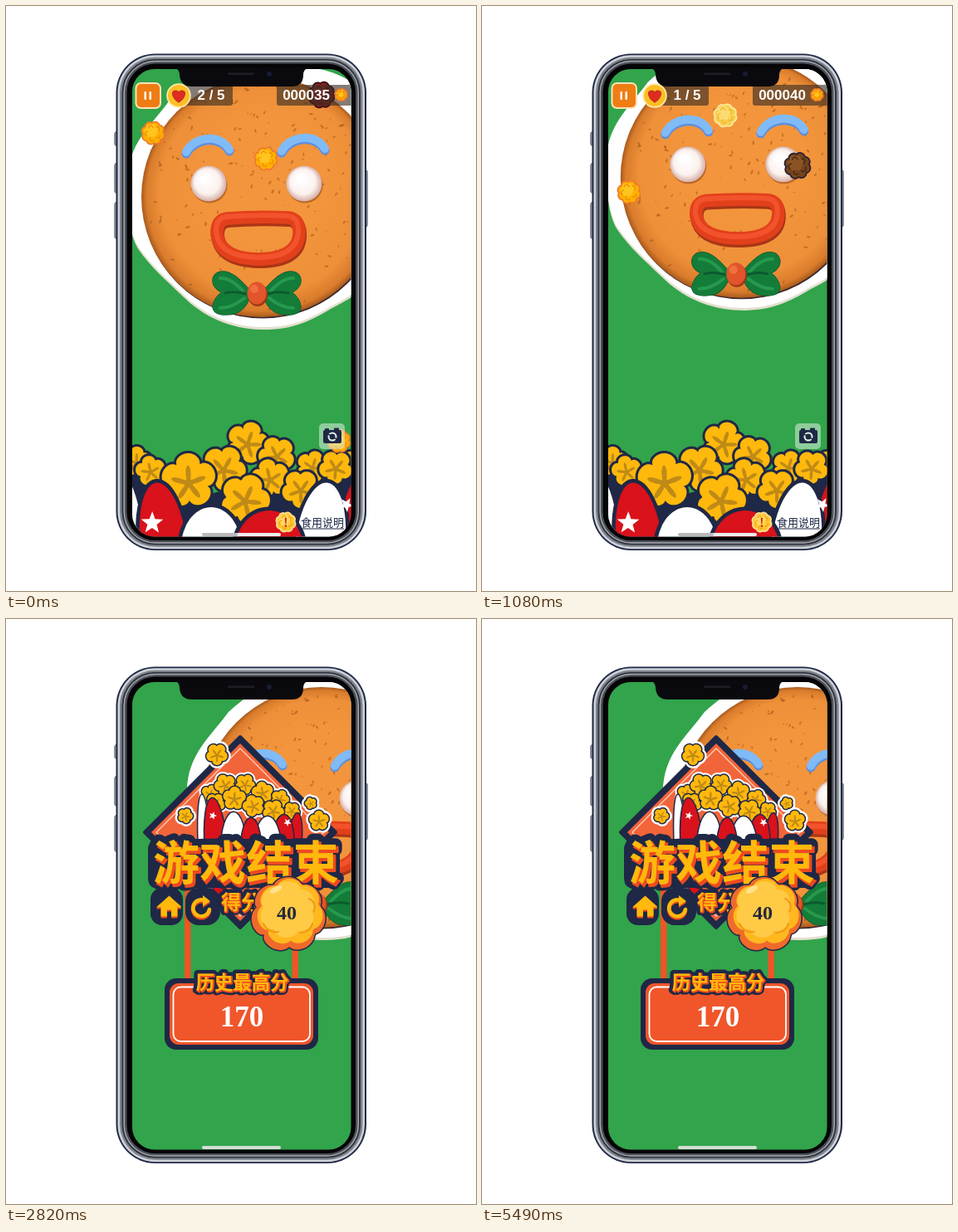
Recreate the animation shown at these times as an HTML page with a canvas. Size 566x705 px, loop 5.52 s.

```html
<!DOCTYPE html>
<html lang="zh">
<head>
<meta charset="utf-8">
<style>
  html, body { margin: 0; width: 566px; height: 705px; overflow: hidden; background: #fff; }
  canvas { display: block; }
</style>
</head>
<body>
<canvas id="stage" width="566" height="705"></canvas>
<script>
const ctx = document.getElementById('stage').getContext('2d');
const LOOP = 5520, GAME_OVER = 2100, EATEN = 740, MISSED = 600;
const NAVY = '#1f2846', GREEN = '#32a44b', GOLD = '#ffb80c', RED = '#d9121b';
const SANS = '"Liberation Sans", Arial, sans-serif';
const SERIF = '"Liberation Serif", "Times New Roman", serif';
const CJK = '"Noto Sans CJK SC", "Noto Sans CJK", sans-serif';
const TAU = Math.PI * 2;

// time, x, y, mouth opening, brow and eye shift
const faceKeys = [
  [0, 0, 0, 1, 0], [810, -3, -24, 1.08, 0], [1170, 5, -23, .9, 0],
  [1440, 86, -21, .32, 0], [1860, 73, -4, 1.04, 0], [GAME_OVER, 72, -3, 1, 1]
];
const goldDrop = [[0, 153], [810, 207], [1440, 247], [1860, 274], [2100, 290]];
const darkDrop = [[0, 107], [810, 167], [1440, 226], [1860, 264], [2100, 286]];
const paleDrop = [[0, 45], [810, 110], [1440, 161], [1860, 197], [2100, 217]];
const nextDrop = [[0, 30], [1440, 97], [1860, 121], [2100, 136]];

function sample(keys, t, ease = k => k) {
  let i = 0;
  while (i < keys.length - 2 && t > keys[i + 1][0]) i++;
  const a = keys[i], b = keys[i + 1];
  const k = ease(Math.min(1, (t - a[0]) / (b[0] - a[0])));
  return a.map((v, n) => v + (b[n] - v) * k);
}
const smooth = k => k * k * (3 - 2 * k);
const dropY = (keys, t) => sample(keys, t)[1];

function paint(path, fill, stroke, width = 1) {
  if (stroke) {
    ctx.strokeStyle = stroke;
    ctx.lineWidth = width;
    ctx.lineJoin = ctx.lineCap = 'round';
    ctx.stroke(path);
  }
  if (fill) { ctx.fillStyle = fill; ctx.fill(path); }
}
function box(x, y, w, h, r, fill, stroke, width) {
  const p = new Path2D();
  p.roundRect(x, y, w, h, r);
  paint(p, fill, stroke, width);
  return p;
}
function oval(x, y, rx, ry, fill, stroke, width, tilt = 0) {
  const p = new Path2D();
  p.ellipse(x, y, rx, ry, tilt, 0, TAU);
  paint(p, fill, stroke, width);
}
const shape = (d, fill, stroke, width) => paint(new Path2D(d), fill, stroke, width);

function polar(x, y, radius) {
  const p = new Path2D();
  for (let i = 0; i < 90; i++) {
    const a = i / 90 * TAU, r = radius(a);
    p.lineTo(x + r * Math.cos(a), y + r * Math.sin(a));
  }
  p.closePath();
  return p;
}
const lobes = (x, y, r, n, depth, turn = 0) =>
  polar(x, y, a => r * (1 - depth + depth * Math.sqrt(Math.abs(Math.cos(n / 2 * (a - turn))))));

function star(x, y, r, turn) {
  const p = new Path2D();
  for (let i = 0; i < 10; i++) {
    const a = turn + i * Math.PI / 5, q = i % 2 ? r * .42 : r;
    p.lineTo(x + q * Math.cos(a), y + q * Math.sin(a));
  }
  paint(p, '#fff');
}
function text(s, x, y, font, fill, stroke, width) {
  ctx.font = font;
  ctx.textAlign = 'center';
  if (stroke) {
    ctx.strokeStyle = stroke;
    ctx.lineWidth = width;
    ctx.lineJoin = 'round';
    ctx.strokeText(s, x, y);
  }
  ctx.fillStyle = fill;
  ctx.fillText(s, x, y);
}
function label(s, x, y, size, border, depth) {
  const font = `bold ${size}px ${CJK}`;
  text(s, x, y, font, NAVY, NAVY, border);
  text(s, x + depth, y + depth, font, '#ee4a20', '#ee4a20', 2);
  text(s, x, y, font, GOLD);
}

function kernel(x, y, r, turn, border = 6) {
  paint(lobes(x, y, r, 5, .32, turn), GOLD, NAVY, border);
  paint(polar(x, y + r * .1, a => r * (.16 + .5 * Math.cos(2.5 * (a - turn)) ** 4)), '#bf8a16');
}
function popcorn(x, y, r, fill, edge, shade, light) {
  paint(lobes(x, y, r, 8, .22, .3), fill, edge, 3.5);
  paint(lobes(x - r * .15, y - r * .2, r * .65, 6, .3, 1), light);
  for (let i = 0; i < 5; i++) {
    const a = i * TAU / 5 + .5, p = new Path2D();
    p.arc(x + r * .5 * Math.cos(a), y + r * .5 * Math.sin(a), r * .22, a - 1, a + 1.8);
    paint(p, null, shade, 1.3);
  }
}
const goldCorn = (x, y, r = 13) => popcorn(x, y, r, '#ffb000', '#f07a2c', '#ef8e08', '#ffc51e');
const paleCorn = (x, y) => popcorn(x, y, 13, '#f8cf4e', '#fbeaa0', '#eeb52f', '#fbdc72');
function darkCorn(x, y, t) {
  const red = t < 400;
  popcorn(x, y, 15, red ? '#8a2023' : '#75431b', red ? '#351018' : '#2b2031',
    red ? '#541319' : '#3e2517', red ? '#a52728' : '#8c5425');
}

// a scallop of the striped bucket
function scallop(x, w, top, bottom, fill, tilt = 0, border = 9) {
  oval(x, bottom, w, bottom - top, fill, NAVY, border, tilt);
}

const specks = (() => {
  let seed = 7;
  const rnd = () => (seed = seed * 16807 % 2147483647) / 2147483647;
  return Array.from({ length: 190 }, () => {
    const a = rnd() * TAU, r = 138 * Math.sqrt(rnd());
    return [308 + r * Math.cos(a), 230 + r * Math.sin(a), .5 + rnd() * 1.4, rnd() * 3];
  });
})();

function eye(x, y) {
  const g = ctx.createRadialGradient(x - 5, y - 7, 3, x, y, 22);
  g.addColorStop(0, '#fff');
  g.addColorStop(.65, '#fbf1ee');
  g.addColorStop(1, '#d3aaa0');
  oval(x + 1, y + 2, 21.5, 21.5, 'rgba(140,65,20,.55)');
  oval(x, y, 21.5, 21.5, g);
}
function brow(x, y) {
  const d = `M${x - 26} ${y + 9}C${x - 16} ${y - 11} ${x + 16} ${y - 13} ${x + 26} ${y + 6}`;
  ctx.save();
  ctx.translate(0, 2);
  shape(d, null, '#5d8fdc', 11);
  ctx.restore();
  shape(d, null, '#80bbf8', 10);
}
function bowTie() {
  const lobe = 'M292 341C284 333 275 321 262 320C251 320 247 328 250 336Q253 342 260 345' +
    'Q250 352 249 363C250 373 264 373 275 371Q287 367 293 353Z';
  for (const side of [1, -1]) {
    ctx.save();
    if (side < 0) { ctx.translate(604, 0); ctx.scale(-1, 1); }
    shape(lobe, '#147c39', '#0c5a2e', 1.5);
    shape('M258 328Q270 327 285 343M258 364Q272 364 287 352', null, '#26994d', 4);
    shape('M264 346Q276 343 289 347', null, '#0b5b2d', 3);
    ctx.restore();
  }
  oval(303, 348, 12, 14, '#a43616');
  oval(302, 346, 11.5, 13.5, '#e2542a');
  oval(299, 341, 5, 5, '#f0703f');
}
function face(t) {
  const [, dx, dy, open, shift] = sample(faceKeys, t, smooth);
  ctx.save();
  ctx.translate(dx, dy);
  const icing = 'M146 214C146 250 149 278 160 294C174 314 190 328 212 349C237 374 269 389 307 390' +
    'C343 391 366 380 391 365C430 345 470 320 476 250C484 160 444 72 340 76C260 72 226 90 196 118' +
    'C174 148 146 170 146 214Z';
  shape(icing, '#e3dfcf');
  ctx.save();
  ctx.translate(0, -3);
  shape(icing, '#fff');
  ctx.restore();

  oval(309, 231.5, 145, 145, '#3a2730');
  const g = ctx.createRadialGradient(312, 208, 70, 308, 230, 145);
  g.addColorStop(0, '#f3953c');
  g.addColorStop(.72, '#ee9039');
  g.addColorStop(.92, '#d97c2c');
  g.addColorStop(1, '#a85a1d');
  oval(308, 230, 145, 145, g);
  for (const [x, y, r, a] of specks) oval(x, y, r * 1.5, r * .7, 'rgba(150,78,18,.5)', null, 0, a);

  ctx.save();
  ctx.translate(-8 * shift, 5 * shift);
  brow(243, 167);
  brow(358, 166);
  eye(244, 214);
  eye(359, 214);
  ctx.restore();

  const Y = y => 280 + (y - 280) * open;
  const mouth = `M266 ${Y(256)}Q303 ${Y(253)} 340 ${Y(255)}Q354 ${Y(256)} 353 ${Y(275)}` +
    `Q351 ${Y(305)} 303 ${Y(305)}Q258 ${Y(304)} 254 ${Y(275)}Q253 ${Y(258)} 266 ${Y(256)}Z`;
  ctx.save();
  ctx.translate(1, 3);
  shape(mouth, null, '#a93516', 16);
  ctx.restore();
  shape(mouth, null, '#e2401b', 15.5);
  ctx.save();
  ctx.translate(-1, -2);
  shape(mouth, null, '#f3532c', 6);
  ctx.restore();
  bowTie();
  ctx.restore();
}

function pile() {
  shape('M152 566Q200 560 240 590Q300 570 345 590Q390 570 416 560V640H152Z', NAVY);
  [[157, 549, 18, 1], [174, 560, 18, 2], [291, 526, 25, 0], [326, 541, 22, .5], [414, 553, 16, 1],
   [369, 555, 19, 0], [397, 556, 20, .4], [262, 557, 27, .2], [318, 569, 23, .7],
   [355, 582, 23, .3], [220, 572, 33, .9], [288, 594, 30, .1]
  ].forEach(k => kernel(...k));
  scallop(150, 17, 567, 650, '#fff', -.1);
  scallop(416, 21, 560, 655, RED, .15);
  scallop(378, 30, 574, 650, '#fff', .12);
  scallop(190, 28, 574, 650, RED, -.12);
  scallop(247, 36, 604, 652, '#fff');
  scallop(317, 41, 608, 654, RED);
  star(176, 623, 14, -.3);
  star(410, 601, 9, .2);
}
function controls() {
  box(377, 503, 31, 31, 5, 'rgba(220,238,222,.55)');
  box(382, 511, 22, 16, 2, NAVY);
  box(384, 509, 5, 3, 1, NAVY);
  box(395, 508.5, 6, 3, 1, NAVY);
  oval(393, 519, 4.5, 4.5, null, '#e6f2e8', 2);
  shape('M387 516l3 1M399 522l-3 -1', null, NAVY, 1.5);
  popcorn(337, 622, 11, '#ffc52d', '#fbdf93', '#f0a61c', '#ffd75e');
  text('!', 337, 628, `bold 16px ${SERIF}`, '#c9281a');
  text('食用说明', 381, 627, `500 13px ${CJK}`, NAVY, '#fff', 2);
  box(355, 629.5, 52, 1, 0, NAVY);
}
function hud(t) {
  box(204, 95, 69, 25, 3, 'rgba(55,45,35,.62)');
  box(326, 95, 92, 25, 3, 'rgba(55,45,35,.62)');
  box(157.5, 94, 27.5, 28, 5, '#ef7d14', '#ffe3b5', 4);
  box(166.5, 103, 2.5, 10, 1, '#fff');
  box(172.5, 103, 2.5, 10, 1, '#fff');
  oval(208, 108, 13, 13, '#ffbd24', '#ffe9a8', 3.5);
  shape('M208 116C199 110 199 102 204 102Q207 102 208 105Q209 102 212 102C217 102 217 110 208 116Z', '#e02a22', '#8f241d', 1.2);
  text(t < MISSED ? '2 / 5' : '1 / 5', 247, 113, `bold 17px ${SANS}`, '#fff');
  text(t < EATEN ? '000035' : '000040', 361.5, 113, `bold 17px ${SANS}`, '#fff');
  goldCorn(403.5, 107, 6.5);
}
function game(t) {
  goldCorn(177, dropY(goldDrop, t));
  if (t < EATEN) goldCorn(313, 184 + t * .085);
  darkCorn(380, dropY(darkDrop, t), t);
  paleCorn(293, dropY(paleDrop, t));
  goldCorn(342, dropY(nextDrop, t));
  goldCorn(295, 88 + (t - 1860) * .065);
  pile();
  if (t < MISSED) goldCorn(401, 524 + t * .2);
  controls();
  hud(t);
}

function diamond(r, fill, stroke, width) {
  shape(`M282 ${257 - r}L${282 + r} 257L282 ${257 + r}L${282 - r} 257Z`, fill, stroke, width);
}
function bucket() {
  [[246, 211, 11, 0], [264, 200, 13, .5], [288, 199, 12, .2], [309, 209, 13, .8], [330, 217, 11, .1],
   [344, 231, 10, .4], [252, 222, 12, .3], [275, 216, 14, 1], [298, 225, 13, .6], [322, 231, 13, .2]
  ].forEach(([x, y, r, a]) => paint(lobes(x, y, r, 5, .3, a), null, '#fff', 7));
  [[246, 211, 11, 0], [264, 200, 13, .5], [288, 199, 12, .2], [309, 209, 13, .8], [330, 217, 11, .1],
   [344, 231, 10, .4], [252, 222, 12, .3], [275, 216, 14, 1], [298, 225, 13, .6], [322, 231, 13, .2]
  ].forEach(k => kernel(...k, 3));
  scallop(239, 7, 212, 275, '#fff', -.05, 3);
  scallop(347, 8, 234, 275, RED, .1, 3);
  scallop(253, 13, 216, 275, RED, -.08, 3);
  scallop(332, 14, 236, 278, RED, .08, 3);
  scallop(274, 15, 233, 278, '#fff', 0, 3);
  scallop(315, 16, 238, 278, '#fff', 0, 3);
  scallop(295, 12, 240, 278, RED, 0, 3);
  star(249, 237, 5, 0);
  star(339, 245, 5, .3);
}
function results() {
  box(215, 320, 7.5, 118, 0, '#ee5427');
  box(344.5, 320, 7.5, 118, 0, '#ee5427');
  diamond(115, NAVY, NAVY, 4);
  diamond(107, '#f2643a');
  diamond(101, null, '#ffd2bd', 1.2);
  bucket();
  [[254, 163, 14, .3], [216, 237, 10, .1], [367, 222, 8, .6], [377, 243, 13, .9]].forEach(([x, y, r, a]) => {
    paint(lobes(x, y, r, 5, .3, a), null, '#fff', 6);
    kernel(x, y, r - 1, a, 3);
  });

  box(171, 265, 231, 59, 12, NAVY);
  box(174, 324, 39, 45, 14, NAVY);
  box(216, 324, 42, 45, 16, NAVY);
  label('游戏结束', 289, 314, 56, 15, 2.5);
  label('得分', 283, 350, 24, 9, 1);
  for (const [dy, color] of [[2, '#ee4a20'], [0, GOLD]]) {
    ctx.save();
    ctx.translate(0, dy);
    shape('M182 347L196.500 334L211 347H206V358H199.500V350H193.500V358H187V347Z', color, color, 1);
    shape('M240 339.500A10 10 0 1 0 245 350', null, color, 4.5);
    shape('M237 333L246 340L237 346Z', color);
    ctx.restore();
  }

  paint(lobes(340, 356, 45, 7, .16, .2), '#ef6a2b', NAVY, 3);
  paint(lobes(342, 353, 40, 7, .17, .2), '#ffb81e');
  paint(lobes(339, 350, 34, 6, .18, .6), '#ffca45');
  oval(325, 326, 8, 3.5, '#ffe28a', null, 0, -.5);
  shape('M365 337Q374 341 371 352M310 367Q316 379 328 377M354 378Q367 377 369 367', null, '#f09a1c', 2);
  text('40', 338, 362, `bold 24px ${SERIF}`, '#25283a');

  box(191, 433, 185, 86, 14, NAVY);
  box(197, 439, 173, 74, 11, '#f0562a');
  box(201.5, 443.500, 164.500, 65.500, 9, null, '#fff', 1.8);
  label('历史最高分', 284.5, 446, 22.3, 9, 1);
  text('170', 284, 491, `bold 35px ${SERIF}`, '#fff');
}

function phone() {
  for (const [x, y, w, h] of [[131, 152, 4, 16], [131, 190, 4, 35], [131, 237, 4, 43], [431, 198, 4, 68]])
    box(x, y, w, h, 1.5, '#858992', NAVY, 1);
  [[132.5, NAVY], [134.5, '#cfd2d7'], [137, '#7f838c'], [139.500, '#30343f'],
   [141.500, '#a6a9af'], [143, '#4c4f58'], [145.500, '#050507']
  ].forEach(([x, color]) => {
    const inset = x - 132.5;
    box(x, 57.5 + inset * .92, 301.500 - inset * 2, 598.500 - inset * 1.84, 47 - inset, color);
  });
}
function notch() {
  shape('M202 74Q209 76 209 83Q210 97 224 97H344Q358 97 358 83Q358 76 365 74Z', '#0a0a0e');
  box(267, 80.500, 32, 2.500, 1, '#1d1e25');
  oval(317, 82, 3, 3, '#161c38');
}

function draw(t) {
  ctx.fillStyle = '#fff';
  ctx.fillRect(0, 0, 566, 705);
  phone();
  const over = t >= GAME_OVER;
  ctx.save();
  ctx.clip(box(152, 76, 263.500, 563.500, 27, GREEN));
  face(Math.min(t, GAME_OVER));
  over ? results() : game(t);
  box(236, 635, 95, 4, 2, over ? '#d5ddd5' : '#ececec');
  if (!over) box(236, 635, 43, 4, 2, '#bcb9bb');
  ctx.restore();
  notch();
}

const start = performance.now();
function tick() {
  draw((performance.now() - start) % LOOP);
  requestAnimationFrame(tick);
}
tick();
</script>
</body>
</html>
```
